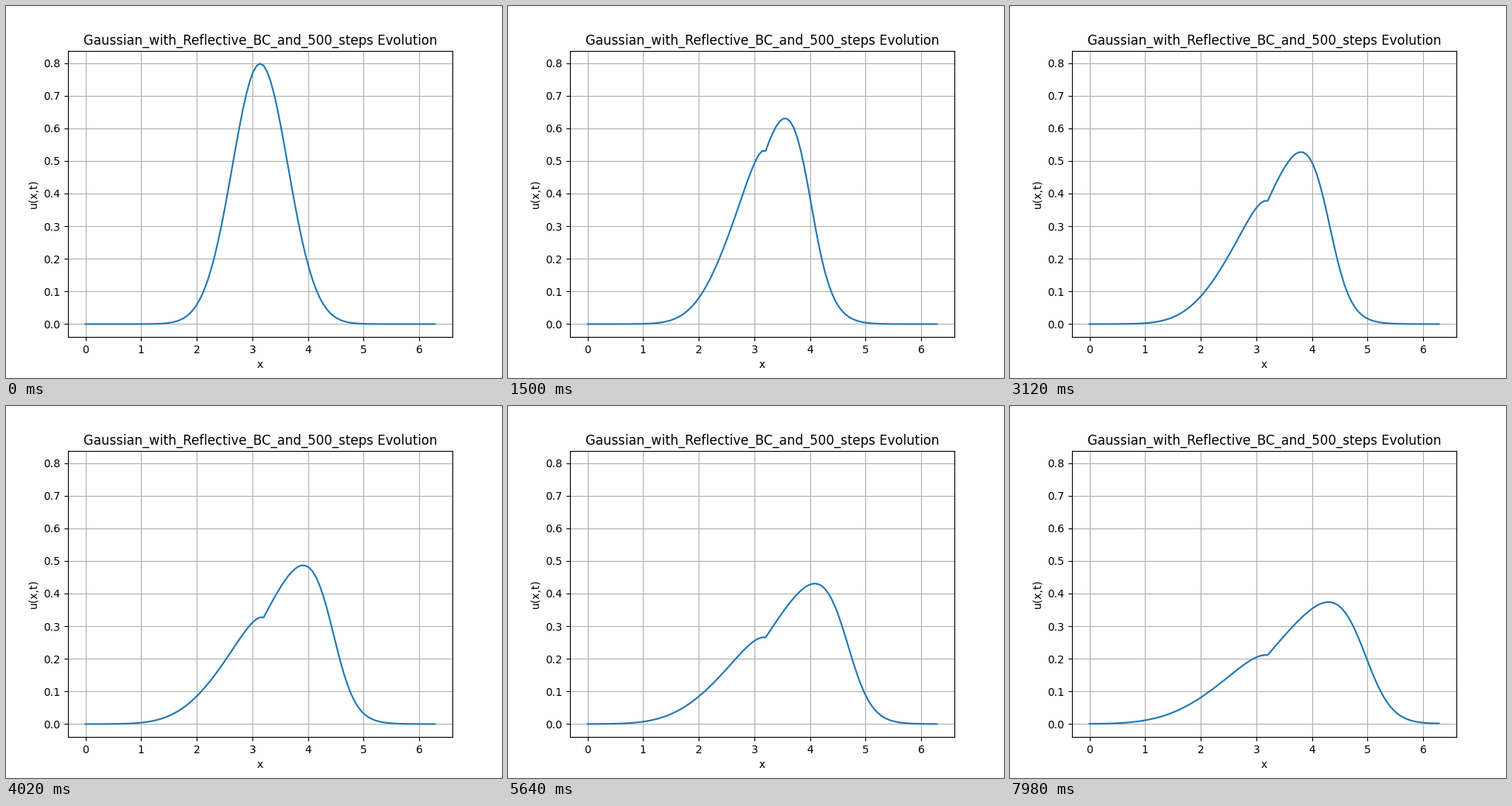
These frames come from a looping animation (640 by 480 pixels, 8 s). A matplotlib script:

```python
import numpy as np
import matplotlib.pyplot as plt
from matplotlib.animation import FuncAnimation

LOOP, TICK, HOLD = 8000, 20, 30   # ms
NX = 101
MID = NX // 2
DX = 2 * np.pi / (NX - 1)
DT = 0.2 * DX
NU = 0.07
SIGMA = 0.5

x = np.linspace(0, 2 * np.pi, NX)


def step(u):
    """Advance the viscous Burgers equation by one explicit upwind step."""
    new = u.copy()
    mid, left, right = u[1:-1], u[:-2], u[2:]
    new[1:-1] = (mid - mid * DT / DX * (mid - left)
                 + NU * DT / DX**2 * (right - 2 * mid + left))
    # reflective walls at both ends and where the two halves meet
    new[0], new[-1] = new[1], new[-2]
    new[MID + 1] = new[MID]
    return new


def solve(steps):
    u = np.exp(-(x - np.pi)**2 / (2 * SIGMA**2)) / (SIGMA * np.sqrt(2 * np.pi))
    states = [u]
    for _ in range(steps):
        states.append(step(states[-1]))
    return states


states = solve(LOOP // HOLD)

fig, ax = plt.subplots(figsize=(6.4, 4.8), dpi=100)
line, = ax.plot(x, states[0])
ax.set_xlim(ax.get_xlim())
ax.set_ylim(ax.get_ylim())
ax.set_title("Gaussian_with_Reflective_BC_and_500_steps Evolution")
ax.set_xlabel("x")
ax.set_ylabel("u(x,t)")
ax.grid(True)


def draw(i):
    n = (i * TICK + TICK // 2) // HOLD
    line.set_ydata(states[min(n, len(states) - 1)])
    return line,


anim = FuncAnimation(fig, draw, frames=LOOP // TICK, interval=TICK,
                     init_func=lambda: draw(0), repeat=True, repeat_delay=0)
plt.show()
```
